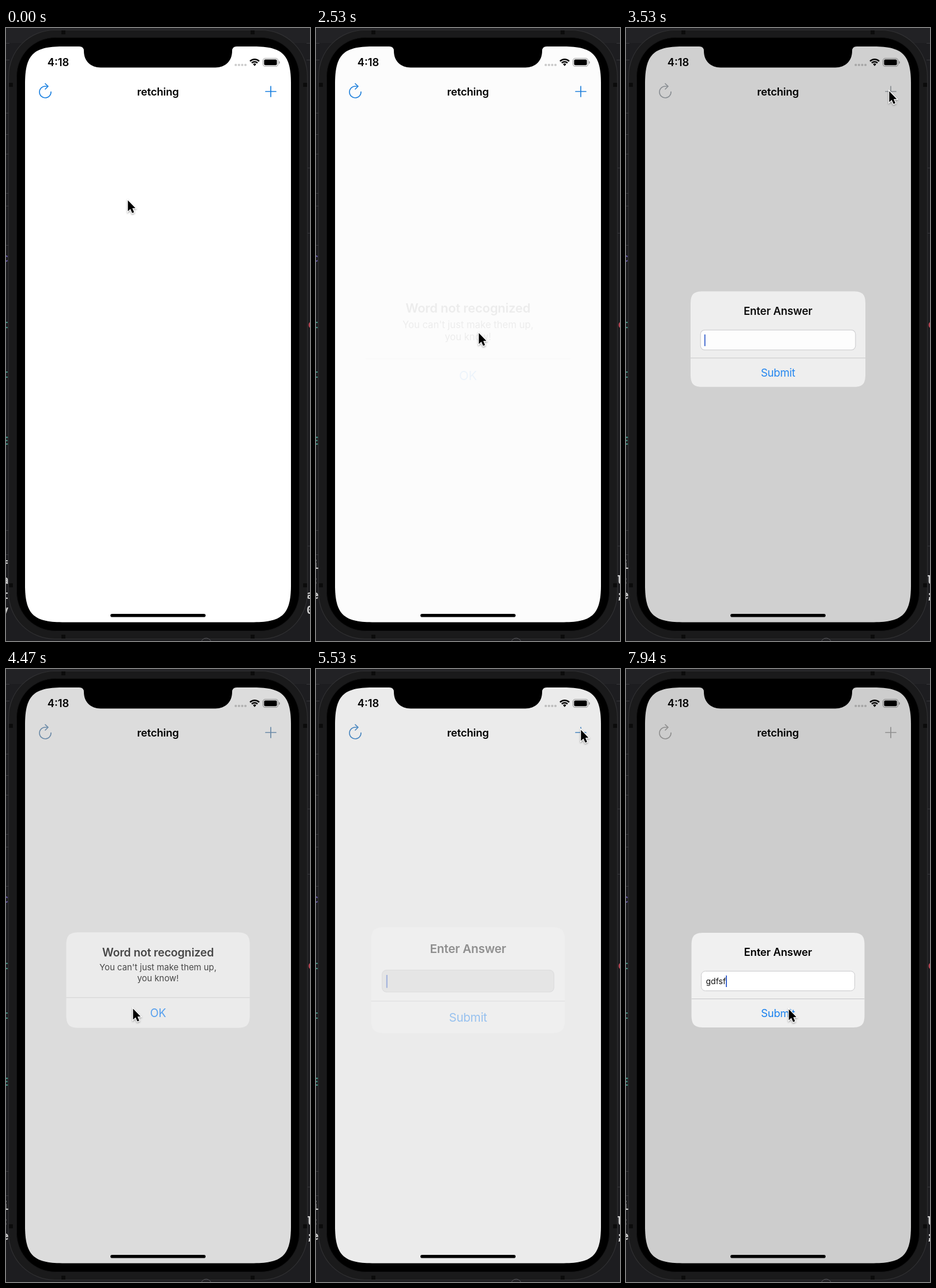
Animation of 527 by 1062 pixels, one loop 8 s. Source, as an HTML page with a canvas:

```html
<!DOCTYPE html>
<html lang="en">
<head>
<meta charset="utf-8">
<title>Word game</title>
<style>
html, body { margin: 0; width: 100%; height: 100%; overflow: hidden; background: #1d1d20; }
canvas { display: block; width: 527px; height: 1062px; }
</style>
</head>
<body>
<canvas id="stage"></canvas>
<script>
const W = 527, H = 1062, LOOP = 8000, CX = 263.5, CY = 539;
const canvas = document.getElementById('stage');
const ctx = canvas.getContext('2d');
const dpr = window.devicePixelRatio || 1;
canvas.width = W * dpr;
canvas.height = H * dpr;

const SANS = 'Inter, Roboto, sans-serif';
const MONO = '"DejaVu Sans Mono", monospace';
const TITLE = { weight: 600, gap: -.15 };
const BUTTON = { gap: -.25 };

// Dialog life: when it starts to appear and when it starts to fade
const dialogs = [
  { kind: 'enter', open: 400, close: 2095, keys: [
    [930, 'r'], [995, 're'], [1060, 'ret'], [1180, 'reth'], [1240, 'ret'], [1470, 'retc'],
    [1530, 'retch'], [1640, 'retchi'], [1700, 'retchin'], [1760, 'retching']] },
  { kind: 'error', open: 2513, close: 2860 },
  { kind: 'enter', open: 3324, close: 3960, keys: [] },
  { kind: 'error', open: 4365, close: 4960 },
  { kind: 'enter', open: 5471, close: 9000, keys: [
    [7640, 'g'], [7750, 'gd'], [7930, 'gdfsf']] }
];

// Pointer path: time, x, y
const path = [
  [120, 211, 297], [390, 457, 106], [480, 457, 106], [780, 427, 280], [2090, 427, 280],
  [2530, 282, 527], [2720, 276, 589], [2880, 276, 589], [3250, 456, 108], [3680, 456, 108],
  [3930, 230, 588], [4060, 220, 587], [4520, 220, 587], [4840, 250, 590], [4980, 250, 590],
  [5380, 459, 104], [5600, 459, 104], [6050, 300, 529], [6530, 300, 529], [7220, 298, 591],
  [7360, 298, 591], [7740, 282, 588]
];

const clamp = v => Math.max(0, Math.min(1, v));
const mix = (a, b, k) => a + (b - a) * k;
const rgb = (a, b, k) => `rgb(${a.map((v, i) => Math.round(mix(v, b[i], k)))})`;
const grey = v => rgb([v, v, v], [v, v, v], 0);

// Critically damped spring from 0 to 1
function spring(ms) {
  if (ms <= 0) return 0;
  const w = ms * 0.02285;
  return 1 - (1 + w) * Math.exp(-w);
}

function pointer(t) {
  if (t <= path[0][0]) return path[0].slice(1);
  for (let i = 1; i < path.length; i++) {
    const [t0, x0, y0] = path[i - 1], [t1, x1, y1] = path[i];
    if (t <= t1) {
      const k = (t - t0) / (t1 - t0);
      const e = k * k * (3 - 2 * k);
      return [mix(x0, x1, e), mix(y0, y1, e)];
    }
  }
  return path[path.length - 1].slice(1);
}

function paint(fill, stroke, lw) {
  if (fill) { ctx.fillStyle = fill; ctx.fill(); }
  if (stroke) { ctx.strokeStyle = stroke; ctx.lineWidth = lw; ctx.stroke(); }
}

function box(x, y, w, h, r, fill, stroke, lw = 1) {
  ctx.beginPath();
  ctx.roundRect(x, y, w, h, r);
  paint(fill, stroke, lw);
}

// Rounded box whose corners ease into the straight sides
function smoothBox(x, y, w, h, r, fill) {
  const e = r * 1.4, c = r * .315, x2 = x + w, y2 = y + h;
  ctx.beginPath();
  ctx.moveTo(x + e, y);
  ctx.lineTo(x2 - e, y);
  ctx.bezierCurveTo(x2 - c, y, x2, y + c, x2, y + e);
  ctx.lineTo(x2, y2 - e);
  ctx.bezierCurveTo(x2, y2 - c, x2 - c, y2, x2 - e, y2);
  ctx.lineTo(x + e, y2);
  ctx.bezierCurveTo(x + c, y2, x, y2 - c, x, y2 - e);
  ctx.lineTo(x, y + e);
  ctx.bezierCurveTo(x, y + c, x + c, y, x + e, y);
  paint(fill);
}

function text(s, x, y, size, color, { weight = 400, align = 'center', gap = 0, font = SANS } = {}) {
  ctx.font = `${weight} ${size}px ${font}`;
  ctx.letterSpacing = gap + 'px';
  ctx.textAlign = align;
  ctx.fillStyle = color;
  ctx.fillText(s, x, y);
}

function trace(points) {
  ctx.beginPath();
  points.forEach(([x, y], i) => i ? ctx.lineTo(x, y) : ctx.moveTo(x, y));
}

function line(points, color, lw) {
  trace(points);
  paint(null, color, lw);
}

function drawDesk(t) {
  ctx.fillStyle = '#1d1d20';
  ctx.fillRect(0, 0, W, H);
  ctx.fillStyle = '#222225';
  ctx.fillRect(0, 0, W, 26);
  for (const y of [26, 55, 147, 184, 218, 286, 308, 376, 870, 912])
    line([[0, y + .5], [6, y + .5]], '#3c3c40', 1);
  for (const y of [26, 55, 242, 355, 897])
    line([[521, y + .5], [W, y + .5]], '#38383c', 1);

  const code = (s, x, y, color) => text(s, x, y, 19, color, { weight: 700, align: 'left', font: MONO });
  code('c', -7, 405, '#6659a0');
  code('t', -7, 520, '#40897c');
  code('t', -7, 606, '#40897c');
  code('E', -7, 722, '#40897c');
  code('c', 523, 520, '#b34653');
  const fresh = t >= 440;
  const left = fresh ? ['i', ':', 'e'] : ['f', 'a', 't', 'y'];
  const right = fresh ? ['', 'l', ';'] : ['', '', 'a', '0'];
  left.forEach((s, i) => code(s, -7, 937 + i * 26, '#d0d0d0'));
  right.forEach((s, i) => code(s, 521, 937 + i * 26, '#d0d0d0'));
}

function drawPhone() {
  box(4.5, 3.5, 518, 1055, 80, '#1a1a1b', '#303032', 1.2);
  ctx.fillStyle = '#0b0b0b';
  for (const x of [96, 424]) {
    ctx.fillRect(x, 4, 7, 7);
    ctx.fillRect(x, 1051, 7, 7);
  }
  for (const y of [95, 962]) {
    ctx.fillRect(5, y, 7, 7);
    ctx.fillRect(515, y, 7, 7);
  }
  box(18.5, 16.5, 490, 1028, 67, '#000', '#141415', 1);
  ctx.beginPath();
  ctx.arc(347, 1066, 9, 0, 7);
  paint(null, '#55555a', 1);
}

function drawStatus() {
  text('4:18', 90.5, 66, 18.4, '#000', { weight: 600 });
  for (let i = 0; i < 4; i++) {
    ctx.beginPath();
    ctx.arc(398.3 + i * 5.6, 64, 2.1, 0, 7);
    paint('rgba(0,0,0,.2)');
  }
  // Wi-fi fan
  const a = -Math.PI * .75, b = -Math.PI * .25;
  for (const r of [11.2, 7]) {
    ctx.beginPath();
    ctx.arc(431, 65.5, r, a, b);
    paint(null, '#000', 2.6);
  }
  ctx.beginPath();
  ctx.moveTo(431, 66);
  ctx.arc(431, 65.5, 3.9, a, b);
  paint('#000');
  // Battery
  box(445.5, 52.5, 26, 14, 4, null, 'rgba(0,0,0,.36)', 1.1);
  box(447.4, 54.4, 22.2, 10.2, 2.3, '#000');
  box(473, 57.2, 1.7, 4.8, [0, 2, 2, 0], 'rgba(0,0,0,.4)');
}

function drawNav(dim) {
  const tint = rgb([24, 127, 224], [142, 142, 142], dim);
  ctx.lineCap = ctx.lineJoin = 'round';
  ctx.beginPath();
  ctx.arc(68, 111, 10, -.05, Math.PI * 1.5);
  ctx.lineTo(72.5, 101);
  paint(null, tint, 1.6);
  line([[68, 96.3], [73, 101], [68, 106]], tint, 1.6);
  line([[450, 110], [468, 110]], tint, 1.7);
  line([[459, 101], [459, 119]], tint, 1.7);
  ctx.lineCap = 'butt';
  text('retching', CX, 117, 18.4, '#000', TITLE);
}

function caretAlpha(t) {
  if (t < 6000 || t > 7600) return 1;
  const fade = (a, b) => clamp((t - a) / (b - a));
  return 1 - fade(6140, 6350) + fade(6530, 6700) - fade(7080, 7240) + fade(7350, 7480);
}

function drawEnter(d, t, p, shown) {
  text('Enter Answer', CX, 497, 18.4, '#000', TITLE);
  // The field turns solid sooner than its panel
  ctx.globalAlpha = clamp(p * 2.5);
  box(130.5, 523.5, 266, 34, 7, grey(212 + 43 * shown));
  ctx.globalAlpha = p;
  box(130.5, 523.5, 266, 34, 7, null, '#c9c9cb');
  let typed = '';
  for (const [at, s] of d.keys) if (t >= at) typed = s;
  text(typed, 138.5, 546.3, 14, '#111', { align: 'left' });
  const end = typed ? 138.4 + ctx.measureText(typed).width : 137;
  ctx.globalAlpha = p * caretAlpha(t);
  ctx.fillStyle = '#4169cf';
  ctx.fillRect(end, 531, 2, 20);
  ctx.globalAlpha = p;
  line([[113.5, 571.5], [413.5, 571.5]], '#c6c6c8', 1);
  text('Submit', CX, 603, 18.4, '#1780ef', BUTTON);
}

function drawError() {
  text('Word not recognized', CX, 500.5, 18.4, '#000', TITLE);
  text("You can't just make them up,", CX, 523, 14, '#000');
  text('you know!', CX, 541, 14, '#000');
  line([[113.5, 567.5], [413.5, 567.5]], '#c6c6c8', 1);
  text('OK', CX, 599, 18.4, '#1780ef', BUTTON);
}

function drawDialog(d, t) {
  const shown = spring(t - d.open);
  const p = shown * (1 - spring(t - d.close));
  if (p < .004) return;
  const size = 1.2 - .2 * shown;
  const height = d.kind === 'enter' ? 164 : 156;
  ctx.save();
  ctx.translate(CX, CY);
  ctx.scale(size, size);
  ctx.translate(-CX, -CY);
  ctx.globalAlpha = p;
  smoothBox(113.5, CY - height / 2, 300, height, 15.5, grey(240 + 8 * (1 - p)));
  if (d.kind === 'enter') drawEnter(d, t, p, shown);
  else drawError();
  ctx.restore();
}

function drawPointer(x, y) {
  ctx.save();
  ctx.translate(x + .3, y + 1.4);
  trace([[0, 0], [0, 19], [4.3, 15], [7.4, 22.2], [10.7, 20.8], [7.7, 13.8], [13, 13.6]]);
  ctx.closePath();
  ctx.lineJoin = 'miter';
  ctx.shadowColor = 'rgba(0,0,0,.35)';
  ctx.shadowBlur = 3 * dpr;
  ctx.shadowOffsetY = 1.5 * dpr;
  paint(null, '#fff', 2.6);
  ctx.shadowColor = 'transparent';
  paint('#000');
  ctx.restore();
}

function drawNotch() {
  ctx.beginPath();
  ctx.moveTo(127, 31);
  ctx.lineTo(127, 32);
  ctx.quadraticCurveTo(135, 32, 135, 40);
  ctx.bezierCurveTo(135, 57, 147, 68.5, 164, 68.5);
  ctx.lineTo(363, 68.5);
  ctx.bezierCurveTo(380, 68.5, 392, 57, 392, 40);
  ctx.quadraticCurveTo(392, 32, 400, 32);
  ctx.lineTo(400, 31);
  paint('#000');
}

function draw(t) {
  ctx.setTransform(dpr, 0, 0, dpr, 0, 0);
  drawDesk(t);
  drawPhone();

  const dim = Math.max(...dialogs.map(d => spring(t - d.open) * (1 - spring(t - d.close))));
  smoothBox(33, 32, 461, 997.5, 46, grey(255 - 50 * dim));
  drawStatus();
  drawNav(dim);
  drawNotch();
  box(181, 1015, 165, 5.6, 2.8, '#000');
  dialogs.forEach(d => drawDialog(d, t));
  drawPointer(...pointer(t));
}

const start = performance.now();
function tick(now) {
  draw(Math.max(0, now - start) % LOOP);
  requestAnimationFrame(tick);
}
draw(0);
requestAnimationFrame(tick);
</script>
</body>
</html>
```
